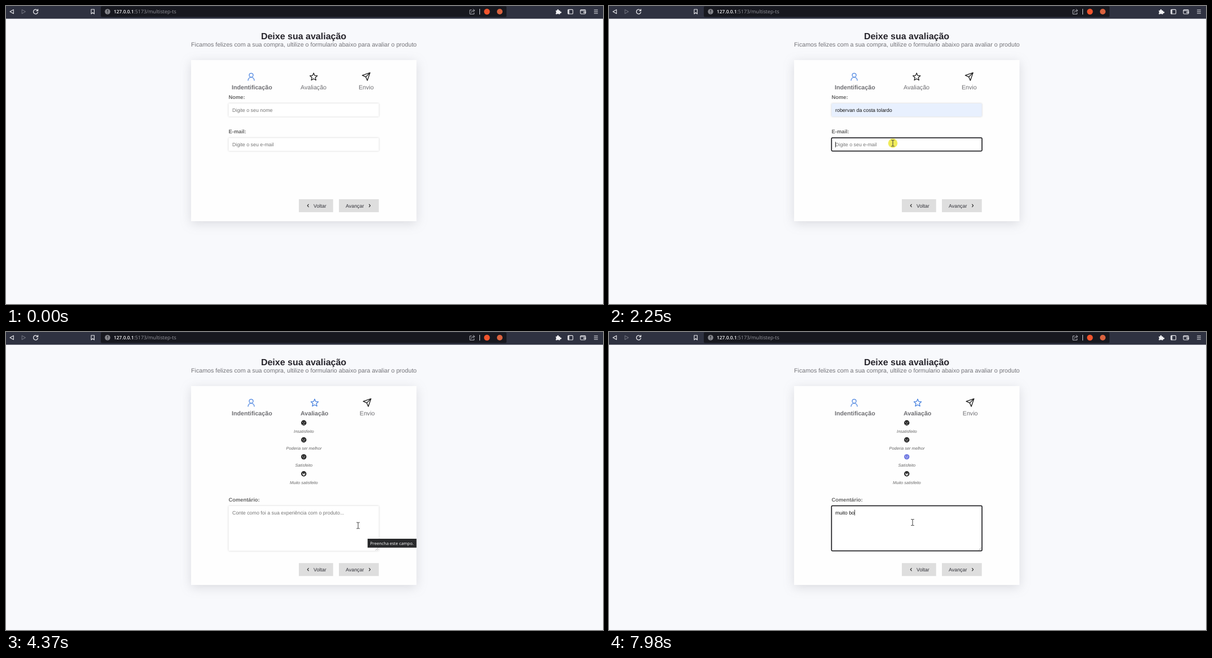
Animation of 1058x529 px, one loop 8000 ms. Source, as an HTML page:

```html
<!DOCTYPE html>
<html lang="pt">
<head>
<meta charset="utf-8">
<title>Deixe sua avaliação</title>
<style>
  html, body { margin: 0; width: 100%; height: 100%; overflow: hidden; background: #f8f9fc; }
  svg { display: block; width: 100vw; height: 100vh; }
  text { font-family: "Liberation Sans", Arial, sans-serif; text-rendering: geometricPrecision; white-space: pre; }
  .ui text, text.ui { font-family: "Open Sans", "Noto Sans", sans-serif; }
  .b { font-weight: 700; }
  .step { font-size: 10.66px; fill: #6e6e72; }
  .label { font-size: 9.33px; font-weight: 700; fill: #666; }
  .input { font-size: 8.88px; fill: #111; }
  .hint { font-size: 8.88px; fill: #757575; }
  .face { font-size: 7.46px; font-style: italic; fill: #666; text-anchor: middle; }
  .line { fill: none; stroke-linejoin: round; stroke-linecap: round; }
  #card { filter: drop-shadow(0 4.7px 9.6px rgba(100, 100, 111, .2)); }
  .box { filter: drop-shadow(0 .9px 1.4px rgba(0, 0, 0, .2)); }
</style>
</head>
<body>
<svg id="stage" viewBox="0 0 1058 529"></svg>
<script>
const LOOP = 8000;
const BLUE = '#4b84e0', DARK = '#222';
const NAME = 'robervan da costa tolardo';
const MAIL = 'robervan_viro@example.com';

const text = (x, y, s, attrs = '') => `<text x="${x}" y="${y}" ${attrs}>${s}</text>`;
const rect = (x, y, w, h, attrs = '') => `<rect x="${x}" y="${y}" width="${w}" height="${h}" ${attrs}/>`;
const path = (d, attrs = '') => `<path d="${d}" ${attrs}/>`;
const circle = (x, y, r, attrs = '') => `<circle cx="${x}" cy="${y}" r="${r}" ${attrs}/>`;

const toolbar = () => `
  ${rect(0, 0, 1058, 22.6, 'fill="#2f3241"')}
  ${rect(168, 0.5, 719, 19, 'rx="2" fill="#17181f"')}
  <g class="line" stroke="#e8e8ec" stroke-width="1.1">
    ${path('M13.3 6.4L7 10L13.3 13.6Z')}
    ${path('M28.2 6.4L34.5 10L28.2 13.6Z', 'stroke="#6c6e7a"')}
    ${path('M56 8A4 4 0 1 0 56.4 11.2M56.6 5.8V8.6H53.8', 'stroke-width="1.3"')}
    ${path('M151 6H156.4V14L153.7 11.8L151 14Z')}
    ${path('M825 7H822V14.3H829.5V12M824.8 11.5C825 9 827 8 830 8M828 5.8L830.6 8L828 10.2', 'stroke="#b9bac2" stroke-width="1"')}
    ${path('M839.5 5.5V14.8', 'stroke="#d5d5da" stroke-width="1"')}
    ${rect(995.8, 6.4, 8.8, 7.6, 'rx="1"')}
    ${path('M997.2 7V13.5', 'stroke-width="2"')}
    ${rect(1018, 6.6, 9, 7.4, 'rx="1.2"')}
    ${path('M1018 8.2H1026M1024 10.2H1027.3V12H1024Z')}
    ${path('M1042.5 7H1048.5M1042.5 10H1048.5M1042.5 13H1048.5')}
  </g>
  ${path('M974.4 8H976.6A1.6 1.6 0 1 1 979.6 8H981.9V10A1.6 1.6 0 1 1 981.9 12.6V14.6H979.4A1.5 1.5 0 0 0 976.8 14.6H974.4V12.4A1.5 1.5 0 0 0 974.4 9.8Z', 'fill="#f0f0f3"')}
  ${circle(180, 10, 4.8, 'fill="#85868c"')}
  ${path('M180 7V10.6M180 12V13', 'stroke="#17181f" stroke-width="1.2"')}
  ${text(191, 13.4, '127.0.0.1', 'class="ui" font-size="8.4" font-weight="600" fill="#f2f2f4"')}
  ${text(226.4, 13.4, ':5173/multistep-ts', 'class="ui" font-size="8.9" fill="#96979e"')}
  ${circle(852.3, 10, 5.2, 'fill="#f0542d"')}
  ${circle(875, 10, 5, 'fill="#d9623f"')}`;

const STAR = Array.from({ length: 10 }, (_, i) => {
  const r = i % 2 ? 3.2 : 7, a = i * Math.PI / 5;
  return (r * Math.sin(a)).toFixed(2) + ' ' + (-r * Math.cos(a)).toFixed(2);
}).join('L');

const steps = () => `
  <g class="line" stroke-width="1.3">
    <g stroke="${BLUE}">${circle(434.5, 122.8, 3.5)}${path('M429 132C429.4 124.8 439.6 124.8 440 132')}</g>
    ${path('M' + STAR + 'Z', 'id="star"')}
    <g id="plane" stroke="${DARK}"><path transform="scale(.69)" stroke-width="2" d="M22 2L11 13M22 2L15 22L11 13L2 9Z"/></g>
  </g>
  ${text(400, 148.4, 'Indentificação', 'class="step b"')}
  ${text(522, 148.4, 'Avaliação', 'class="step" id="step2"')}
  ${text(625, 148.4, 'Envio', 'class="step" id="step3"')}`;

const field = (id, y, h, hint) => `
  ${rect(394.5, y, 266.2, h, `rx="1.3" class="box" id="${id}Box"`)}
  ${rect(394.4, y - .3, 266.6, h + .4, `rx="1.6" fill="none" stroke="#0c0c10" stroke-width="1.5" id="${id}Ring"`)}
  ${text(401, y + 15, hint, `class="hint" id="${id}Hint"`)}
  ${text(401, y + 15, '', `class="input" id="${id}Text"`)}
  ${rect(0, y + 6.8, .8, 10, `fill="#111" id="${id}Caret"`)}`;

const popup = (id, x, y, w, row, size, items) => `
  <g id="${id}" class="ui">
    ${rect(x, y, w, row * 3 + 4, 'rx="1.5" fill="#28292c"')}
    <g id="${id}Hot" fill="#28292c">${path(`M${x + 8} ${y + .3}l6 -6l6 6z`)}${rect(x, y, w, row + 3, 'rx="1.5"')}</g>
    ${items.map((s, i) => text(x + 6.8, y + 17 + i * row, s, `font-size="${size}" fill="#fff"`)).join('')}
  </g>`;

const MOUTHS = ['M-1.9 2.6Q0 .4 1.9 2.6', 'M-1.8 1.8H1.8', 'M-2 1.2Q0 3.4 2 1.2', 'M-2.4 .8Q0 5 2.4 .8Z'];
const face = (s, i) => {
  const y = 161.3 + i * 30.15;
  return `<g transform="translate(527.7 ${y})">
    ${circle(0, 0, 4.7, `fill="${DARK}" id="face${i}"`)}
    ${circle(-1.7, -1, .75, 'fill="#fff"')}${circle(1.7, -1, .75, 'fill="#fff"')}
    ${path(MOUTHS[i], `class="line" stroke="#fff" stroke-width=".7" ${i == 3 ? 'style="fill:#fff"' : ''}`)}
  </g>` + text(527.9, y + 17.8, s, 'class="face"');
};

const buttons = () => `
  <g id="buttons">
    ${rect(519, 343, 60.7, 23, 'fill="#dedede"')}${rect(590, 343, 70.7, 23, 'fill="#dedede"')}
    <g font-size="8.88" fill="#33333a">${text(545, 357.6, 'Voltar')}${text(602, 357.6, 'Avançar')}</g>
    <g class="line" stroke="#222" stroke-width="1.1">${path('M536.2 352.2L534.2 354.4L536.2 356.6')}${path('M643.6 352.2L645.6 354.4L643.6 356.6')}</g>
  </g>`;

const stage = document.getElementById('stage');
stage.innerHTML = `
  ${rect(0, 0, 1058, 529, 'fill="#f8f9fc"')}
  ${toolbar()}
  ${text(527.5, 58.7, 'Deixe sua avaliação', 'class="b" font-size="16" text-anchor="middle" fill="#26242b"')}
  ${text(328, 72, 'Ficamos felizes com a sua compra, ultilize o formulario abaixo para avaliar o produto', 'font-size="10.66" fill="#737378"')}
  ${rect(328, 96, 399.5, 286, 'fill="#fefefe" id="card"')}
  ${steps()}
  <g id="page1">
    ${text(394.6, 165, 'Nome:', 'class="label"')}${field('name', 173, 23.3, 'Digite o seu nome')}
    ${text(394.6, 226.3, 'E-mail:', 'class="label"')}${field('mail', 234.2, 23.1, 'Digite o seu e-mail')}
  </g>
  <g id="page2">
    ${['Insatisfeito', 'Poderia ser melhor', 'Satisfeito', 'Muito satisfeito'].map(face).join('')}
    ${text(394.6, 300.6, 'Comentário:', 'class="label"')}
    ${field('note', 308.8, 79.6, 'Conte como foi a sua experiência com o produto...')}
    ${path('M655 387.5L660 382.5M658 387.5L660 385.5', 'stroke="#777" stroke-width=".7"')}
  </g>
  ${buttons()}
  ${popup('names', 462, 204, 116.5, 23.4, 7.9, [NAME, 'Robervan da Costa tolardC', 'robrs'])}
  ${popup('mails', 460.5, 264, 135.5, 24.1, 8.25, [MAIL, 'robervan.58@example.com', 'robervan.58@examplecom'])}
  <g id="tip">
    ${rect(640.8, 367, 86.7, 15.8, 'fill="#28292b"')}
    ${text(645.3, 378, 'Preencha este campo.', 'class="ui" font-size="7.5" fill="#fff"')}
  </g>
  <g id="cursor">
    ${circle(0, 0, 8.3, 'id="click" fill="#e8e000" opacity=".65"')}
    ${path('M0 0V10.6L2.5 8.4L4.3 12.4L6 11.6L4.2 7.8H7.4Z', 'id="arrow" fill="#fff" stroke="#444" stroke-width=".7" stroke-linejoin="round"')}
    ${path('M-2.4 -5.4H-.6L0 -4.8L.6 -5.4H2.4M0 -4.8V4.8M-2.4 5.4H-.6L0 4.8L.6 5.4H2.4', 'id="beam" class="line" stroke="#3a3a3a" stroke-width="1"')}
  </g>`;

const el = {};
stage.querySelectorAll('[id]').forEach(n => el[n.id] = n);
const set = (id, k, v) => el[id].setAttribute(k, v);
const show = (id, on) => { el[id].style.display = on ? '' : 'none'; };
const clamp = v => Math.max(0, Math.min(1, v));
const between = (t, a, b) => t >= a && t < b;

// Pointer stops: time, x, y
const ROUTE = [
  [110, 850, 442], [710, 520.5, 178], [1100, 520.5, 178], [1380, 524, 217], [1600, 524, 217],
  [1950, 545, 345], [2200, 503, 243.5], [2380, 503, 243.5], [2650, 504.7, 275], [3050, 504.7, 275],
  [3393, 624, 343.5], [4370, 624, 343.5], [4710, 520, 239.5], [4880, 520, 239.5], [5060, 528, 219.5],
  [5300, 528, 219.5], [5650, 529, 323], [5790, 537, 412], [5880, 538, 338]
];
const CLICKS = [[710, 920], [1520, 1700], [2200, 2380], [2850, 3010], [3600, 3840], [5100, 5300], [5880, 6110]];
const KEYS = [6660, 6860, 6930, 7120, 7220, 7320, 7850, 7980];
const PAGE2 = 3700;

function pointer(t) {
  const i = ROUTE.findIndex(p => p[0] > t);
  if (i < 0) return ROUTE[ROUTE.length - 1].slice(1);
  const [t0, x0, y0] = ROUTE[Math.max(0, i - 1)], [t1, x1, y1] = ROUTE[i];
  const u = t1 > t0 ? clamp((t - t0) / (t1 - t0)) : 0, e = u * u * (3 - 2 * u);
  return [x0 + (x1 - x0) * e, y0 + (y1 - y0) * e];
}

function drawField(id, value, focus, filled, caretAge) {
  show(id + 'Ring', focus);
  show(id + 'Hint', !value);
  set(id + 'Box', 'fill', filled ? '#e8f0fe' : '#fff');
  if (el[id + 'Text'].textContent !== value) el[id + 'Text'].textContent = value;
  const blink = focus && caretAge >= 0 && caretAge % 1000 < 500;
  show(id + 'Caret', blink);
  if (blink) set(id + 'Caret', 'x', 400.9 + (value ? el[id + 'Text'].getComputedTextLength() : 0));
}

function drawPopup(id, t, open, hover, close) {
  show(id, between(t, open, close + 190));
  set(id, 'opacity', 1 - clamp((t - close) / 190));
  set(id + 'Hot', 'fill', t >= hover ? '#404144' : '#28292c');
}

function draw(t) {
  const second = t >= PAGE2;
  show('page1', !second);
  show('page2', second);
  set('card', 'height', second ? 353 : 286);
  set('buttons', 'transform', `translate(0 ${second ? 67.2 : 0})`);
  set('star', 'transform', `translate(${second ? 547 : 545.2} 126)`);
  set('star', 'stroke', second ? BLUE : DARK);
  set('plane', 'transform', `translate(${second ? 631.7 : 630} 117)`);
  set('step2', 'class', second ? 'step b' : 'step');
  set('step3', 'x', second ? 626.8 : 625);

  if (!second) {
    const nameIn = t >= 1260, mailIn = t >= 2560;
    drawField('name', nameIn ? NAME : '', between(t, 710, 2200), nameIn,
      t >= 1600 ? t - 1600 : nameIn ? -1 : t - 710);
    drawField('mail', mailIn ? MAIL : '', t >= 2200, mailIn,
      t >= 2950 ? t - 2950 : mailIn ? -1 : t - 2200);
  } else {
    const n = KEYS.filter(k => k <= t).length;
    drawField('note', 'muito bo'.slice(0, n), t >= 5880, false, t - (n ? KEYS[n - 1] : 5880));
    set('face2', 'fill', t >= 5180 ? '#6a74e0' : DARK);
  }

  drawPopup('names', t, 850, 1250, 1600);
  drawPopup('mails', t, 2320, 2500, 2950);
  show('tip', between(t, 4370, 4440));

  const [x, y] = pointer(t);
  const rows = second ? [[308, 389]] : [[173, 197], [234, 258]];
  const beam = between(x, 394, 661) && rows.some(([a, b]) => between(y, a, b));
  show('cursor', t >= 110);
  set('cursor', 'transform', `translate(${x.toFixed(2)} ${y.toFixed(2)})`);
  show('click', CLICKS.some(([a, b]) => between(t, a, b)));
  show('beam', beam);
  show('arrow', !beam);
}

const start = performance.now();
function tick() {
  draw((performance.now() - start) % LOOP);
  requestAnimationFrame(tick);
}
tick();
</script>
</body>
</html>
```
